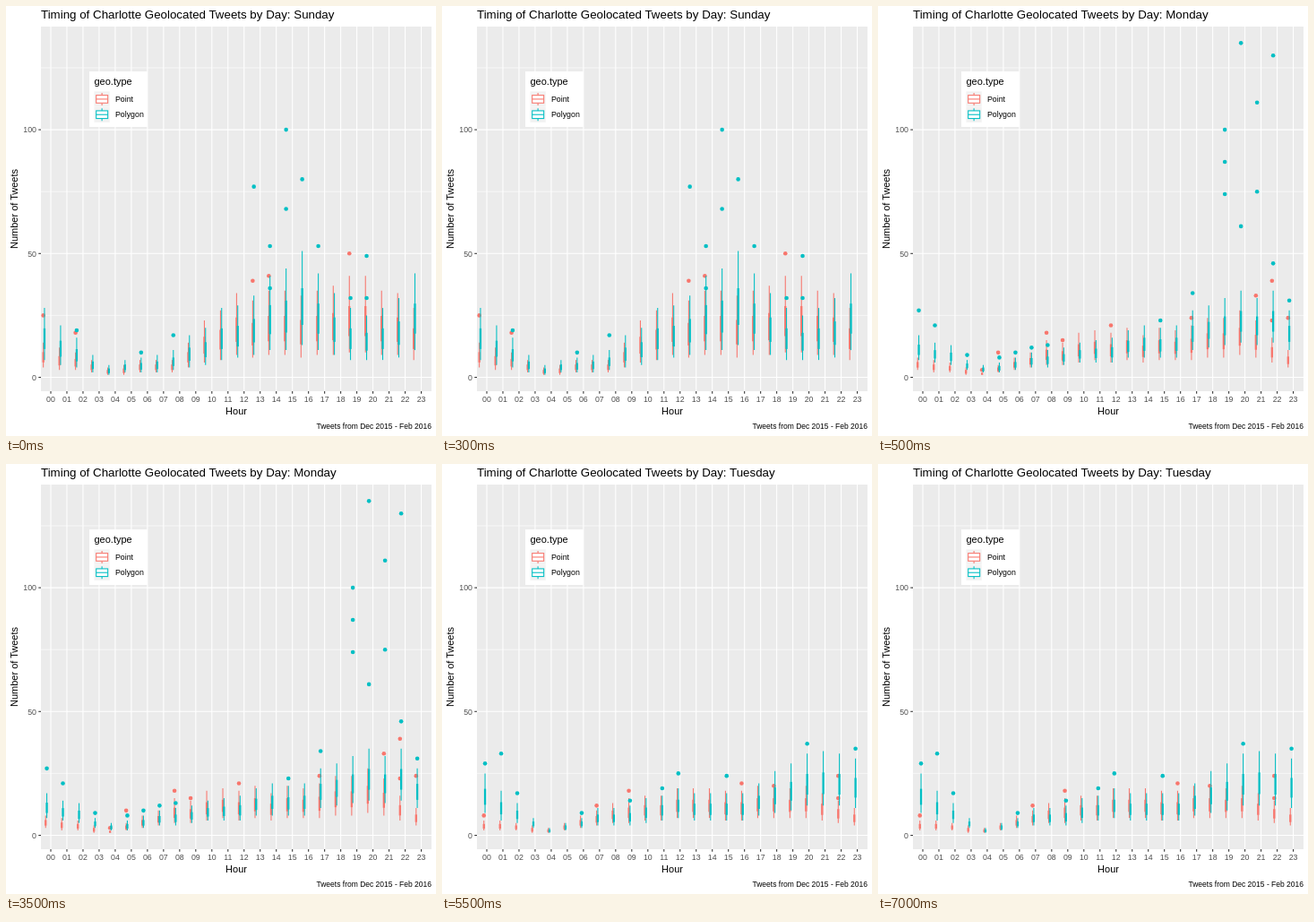
Write an HTML page that moves like this. It is 480 by 480 pixels and loops after 8 s.

```html
<!DOCTYPE html>
<html lang="en">
<head>
<meta charset="utf-8">
<title>Tweets by hour</title>
<style>
  html, body { margin: 0; width: 100%; height: 100%; overflow: hidden; background: #fff; }
  svg { display: block; width: 100vw; height: 100vh; font: 8.8px "Liberation Sans", Arial, sans-serif; }
  .big { font-size: 11px; }
  .title { font-size: 13.33px; }
  .caption { font-size: 8.5px; }
  .tick { fill: #4d4d4d; }
  .day { visibility: hidden; animation: 8s step-end infinite; }
  #sunday { animation-name: sunday; }
  #monday { animation-name: monday; }
  #tuesday { animation-name: tuesday; }
  @keyframes sunday { 0% { visibility: visible } 6.25%, 100% { visibility: hidden } }
  @keyframes monday { 0% { visibility: hidden } 6.25% { visibility: visible } 68.75%, 100% { visibility: hidden } }
  @keyframes tuesday { 0% { visibility: hidden } 68.75%, 100% { visibility: visible } }
</style>
</head>
<body>
<svg viewBox="0 0 480 480">
  <rect x="39" y="23" width="436" height="407" fill="#ebebeb"/>
  <g id="axes"></g>
  <g id="days"></g>
  <rect x="93" y="73" width="65" height="62" fill="#fff"/>
  <text class="big" x="98.5" y="88.4">geo.type</text>
  <g id="legend"></g>
  <text class="big" x="257" y="455.7" text-anchor="middle">Hour</text>
  <text class="big" transform="translate(13 226.5) rotate(-90)" text-anchor="middle">Number of Tweets</text>
  <text class="caption" x="475" y="472" text-anchor="end">Tweets from Dec 2015 - Feb 2016</text>
</svg>
<script>
const colors = { point: '#f8766d', polygon: '#00bfc4' };

// tops: upper whisker every four hours; floor: lower whisker as a share of the upper; peaks: standout dots by hour
const days = {
  Sunday: {
    shift: -7.7,
    point: { tops: [15, 4, 8, 34, 34, 38, 26], floor: 0.25, peaks: { 0: [25], 2: [18], 13: [39], 14: [41], 19: [50] } },
    polygon: {
      tops: [26, 5, 11, 30, 50, 24, 48], floor: 0.26,
      peaks: { 8: [17], 13: [77], 14: [53, 36], 15: [100, 68], 16: [80], 17: [53], 20: [49, 32] }
    }
  },
  Monday: {
    shift: -5.1,
    point: { tops: [9, 2, 14, 19, 18, 28, 5], floor: 0.35, peaks: { 5: [10], 9: [15], 21: [33], 22: [39, 23], 23: [24] } },
    polygon: {
      tops: [18, 5, 12, 17, 22, 37, 28], floor: 0.4,
      peaks: { 0: [27], 1: [21], 15: [23], 17: [34], 19: [100, 87, 74], 20: [135, 61], 21: [111, 75], 22: [130, 46] }
    }
  },
  Tuesday: {
    shift: -2.6,
    point: { tops: [7, 3, 13, 18, 19, 19, 8], floor: 0.35, peaks: { 18: [20], 22: [24, 15] } },
    polygon: { tops: [24, 3, 12, 18, 18, 32, 30], floor: 0.36, peaks: { 1: [33], 2: [17], 12: [25], 15: [24], 20: [37], 23: [35] } }
  }
};

const x = hour => 50 + 17.98 * hour;
const y = count => 414.5 - 2.764 * count;
const line = (x1, y1, x2, y2, color, width = 1.07) =>
  `<path d="M${x1} ${y1}L${x2} ${y2}" stroke="${color}" stroke-width="${width}"/>`;
const label = (px, py, text, anchor = 'middle') =>
  `<text class="tick" x="${px}" y="${py}" text-anchor="${anchor}">${text}</text>`;

function seededRandom(seed) {
  return () => (seed = (seed * 16807) % 2147483647) / 2147483647;
}

function interpolate(values, position) {
  const i = Math.floor(position);
  return values[i] + (values[i + 1] - values[i]) * (position - i);
}

function axes() {
  let out = '';
  for (const v of [25, 75, 125]) out += line(39, y(v), 475, y(v), '#fff', 0.55);
  for (const v of [0, 50, 100]) {
    out += line(39, y(v), 475, y(v), '#fff') + line(36.3, y(v), 39, y(v), '#333') + label(34, y(v) + 3.2, v, 'end');
  }
  for (let h = 0; h < 24; h++) {
    out += line(x(h), 23, x(h), 430, '#fff') + line(x(h), 430, x(h), 432.7, '#333')
      + label(x(h), 441.8, String(h).padStart(2, '0'));
  }
  return out;
}

function boxPlot(cx, low, high, dots, color) {
  const at = share => y(low + (high - low) * share);
  return line(cx, at(0), cx, at(1), color) + line(cx, at(0.22) + 0.5, cx, at(0.6) - 0.5, color, 2.3)
    + dots.map(v => `<circle cx="${cx}" cy="${y(v)}" r="2.3" fill="${color}"/>`).join('');
}

function series(type, { tops, floor, peaks }, offset, random) {
  let out = '';
  for (let h = 0; h < 24; h++) {
    const high = Math.round(interpolate(tops, h / 4) * (0.9 + 0.2 * random()));
    const low = Math.max(1, Math.round(high * floor));
    const stray = random() < 0.2 ? [Math.round(high * 1.1) + 1] : [];
    out += boxPlot(x(h) + offset, low, high, peaks[h] || stray, colors[type]);
  }
  return out;
}

function day([name, data], index) {
  const random = seededRandom(4242 + 977 * index);
  return `<g class="day" id="${name.toLowerCase()}">
    <text class="title" x="39" y="14">Timing of Charlotte Geolocated Tweets by Day: ${name}</text>
    ${series('point', data.point, data.shift - 0.65, random)}
    ${series('polygon', data.polygon, data.shift + 0.65, random)}</g>`;
}

function legendKey(name, top, color) {
  const mid = top + 8.64;
  return `<rect x="98.5" y="${top}" width="17.28" height="17.28" fill="#f2f2f2"/>`
    + line(107.1, top + 1.7, 107.1, top + 15.6, color)
    + `<rect x="100.7" y="${mid - 4.3}" width="12.96" height="8.64" fill="#fff" stroke="${color}" stroke-width="1.07"/>`
    + line(100.7, mid, 113.7, mid, color)
    + `<text x="122" y="${mid + 3.2}">${name}</text>`;
}

const fill = (id, markup) => { document.getElementById(id).innerHTML = markup; };
fill('axes', axes());
fill('days', Object.entries(days).map(day).join(''));
fill('legend', legendKey('Point', 95.3, colors.point) + legendKey('Polygon', 112.6, colors.polygon));
</script>
</body>
</html>
```
